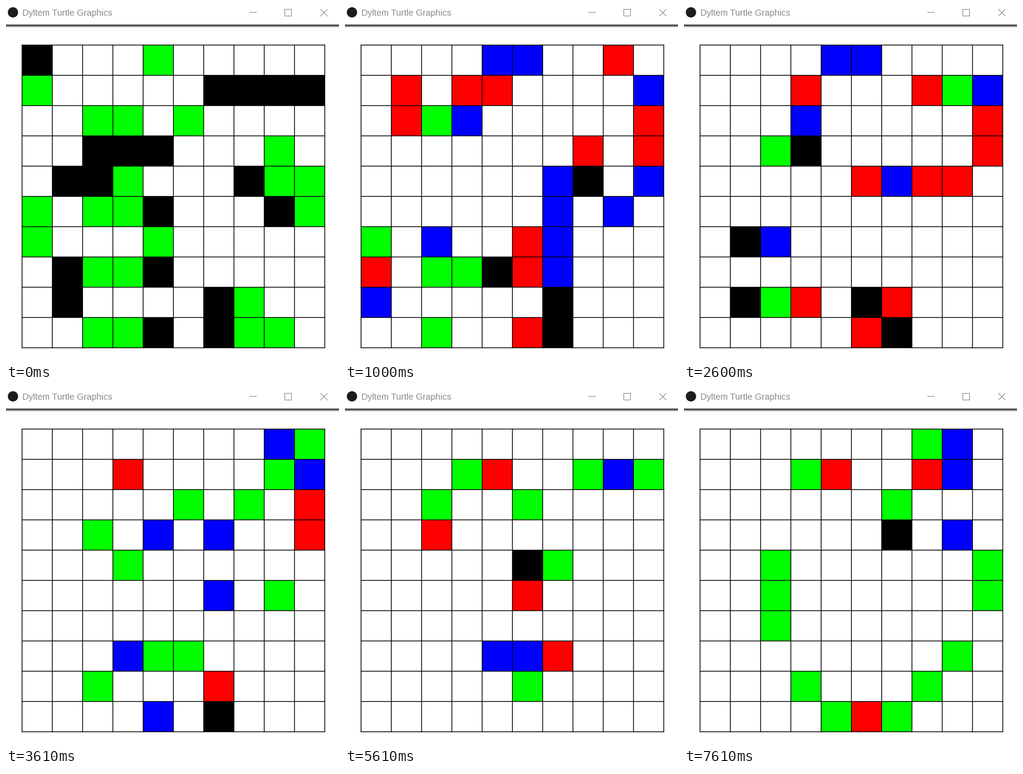
These frames come from a looping animation (550x588 px, 8 s). A matplotlib script:

```python
import numpy as np
import matplotlib.pyplot as plt
from matplotlib.animation import FuncAnimation
from matplotlib.patches import Circle, Rectangle

W, H, DPI = 550, 588, 100
PX = 72 / DPI                      # points per pixel
CELL, N = 50, 10
LEFT, TOP = 26.5, 64.5
RIGHT, BOTTOM = LEFT + N * CELL, TOP + N * CELL

# white, then the colours newborn cells take in turn
PALETTE = np.array([(255, 255, 255), (255, 0, 0), (0, 0, 255),
                    (0, 255, 0), (0, 0, 0)], dtype=np.uint8)

SEED = """
K...G.....
G.....KKKK
..GG.G....
..KKK...G.
.KKG...KGG
G.GGK...KG
G...G.....
.KGGK.....
.K....KG..
..GGK.KGG.
""".split()

TICK = 200
TOTAL = 8000 // TICK
# ticks at which a new generation appears
STEPS = [2, 5, 8, 10, 13, 15, 18, 20, 23, 25, 28, 31, 33, 36, 38]


def evolve(grid, newborn):
    """One step of Life with dead borders; survivors keep their colour."""
    alive = np.pad((grid > 0).astype(int), 1)
    near = sum(alive[r:r + N, c:c + N]
               for r in range(3) for c in range(3)) - (grid > 0)
    keep = (grid > 0) & ((near == 2) | (near == 3))
    born = (grid == 0) & (near == 3)
    return np.where(keep, grid, np.where(born, newborn, 0))


generations = [np.array([[".RBGK".index(ch) for ch in row] for row in SEED])]
for n in range(len(STEPS)):
    generations.append(evolve(generations[-1], n % 4 + 1))

fig = plt.figure(figsize=(W / DPI, H / DPI), dpi=DPI, facecolor="white")
ax = fig.add_axes([0, 0, 1, 1])
ax.axis("off")


def line(xs, ys, color, width):
    ax.plot(xs, ys, color=color, lw=width * PX, snap=False,
            solid_capstyle="projecting", zorder=3)


def bar(y, height, color):
    ax.add_patch(Rectangle((0, y), W, height, color=color, lw=0))


# title bar
GREY = "#8a8a8a"
ax.add_patch(Circle((11.5, 10.5), 8.5, color="#1c1c1c", lw=0))
ax.text(27, 16, "Dyltem Turtle Graphics", family="Liberation Sans",
        size=14.5 * PX, color=GREY, va="baseline")
line([402.5, 413.5], [10.5, 10.5], GREY, 1)
line([460.5, 471.5, 471.5, 460.5, 460.5], [5.5, 5.5, 16.5, 16.5, 5.5], GREY, 1)
line([519.5, 530.5], [5.5, 16.5], GREY, 1)
line([519.5, 530.5], [16.5, 5.5], GREY, 1)
bar(30, 1, "#b4b4b4")
bar(31, 2, "#404040")
bar(33, 2, "#a4a4a4")

# board
cells = ax.imshow(PALETTE[generations[0]], extent=(LEFT, RIGHT, BOTTOM, TOP),
                  interpolation="nearest", aspect="auto", zorder=2)
for i in range(N + 1):
    x, y = LEFT + i * CELL, TOP + i * CELL
    line([x, x], [TOP, BOTTOM], "black", 1.3)
    line([LEFT, RIGHT], [y, y], "black", 1.3)

ax.set_xlim(0, W)
ax.set_ylim(H, 0)


def draw(tick):
    gen = sum(tick >= s for s in STEPS)
    cells.set_data(PALETTE[generations[gen]])
    return [cells]


anim = FuncAnimation(fig, draw, frames=TOTAL, interval=TICK,
                     repeat=True, repeat_delay=0, blit=False)
plt.show()
```
